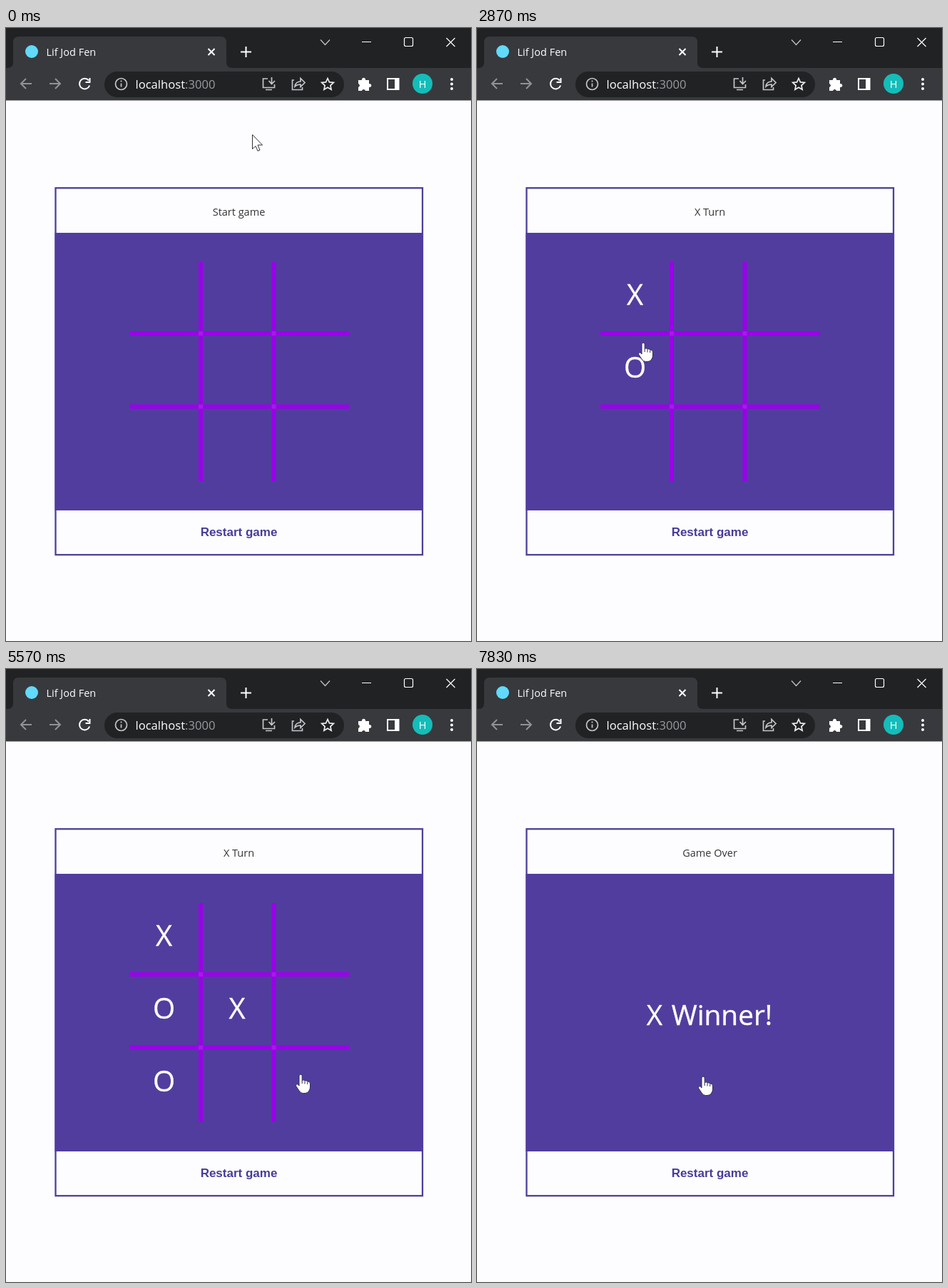
An HTML page that plays this animation: 652x859 px, repeating every 8 s.

```html
<!DOCTYPE html>
<html lang="en">
<head>
<meta charset="utf-8">
<title>Board game</title>
<style>
html, body { margin: 0; width: 100%; height: 100%; overflow: hidden; background: #fdfdff; }
svg { display: block; width: 652px; height: 859px; font-family: "Open Sans", "Noto Sans", sans-serif; }
.mid { text-anchor: middle; }
.mark { font-size: 40px; fill: #fff; stroke: #fff; stroke-width: .4; text-anchor: middle; }
#winner { font-size: 38.8px; word-spacing: 2.5px; }
.icon { fill: none; stroke: #fff; stroke-width: 2; }
.thin { stroke-width: 1.2; }
.dim { stroke: #c4c6ca; stroke-width: 1.7; }
</style>
</head>
<body>
<svg viewBox="0 0 652 859">
  <rect width="652" height="57" fill="#202224"/>
  <rect y="56" width="652" height="45.5" fill="#38393d"/>
  <path d="M2 56Q10 56 10 48V20Q10 12 18 12H301Q309 12 309 20V48Q309 56 317 56Z" fill="#38393d"/>
  <circle cx="36" cy="33" r="9" fill="#61dafb"/>
  <text x="56.5" y="38.5" font-size="14.5" font-weight="500" fill="#fff">Lif Jod Fen</text>
  <path class="icon" d="M283.500 29l9 9m0-9l-9 9M329 33.500h15m-7.500-7.500v15"/>
  <g class="icon thin">
    <path d="M441 16.500l6.500 7 6.500-7" stroke="#c4c6ca"/>
    <path d="M499 19.500h13M617.500 14l12 12m0-12l-12 12"/>
    <rect x="558.500" y="13.500" width="12" height="12" rx="2"/>
  </g>
  <g class="icon">
    <path d="M36 78H21m7-7l-7 7 7 7M61 78h15m-7-7l7 7-7 7" stroke="#8f9296"/>
    <path d="M116 73.500a7.300 7.300 0 1 0 1.200 7M117.500 70v6h-6"/>
  </g>
  <rect x="138" y="61" width="336" height="36" rx="18" fill="#202224"/>
  <g class="icon dim">
    <circle cx="161.500" cy="78.500" r="8"/>
    <path d="M161.500 77.500v5m0-9v2"/>
    <path d="M367 71h-6.500v12.500h16V79M364 86.500h9M372.500 69v9m-4-4l4 4.500 4.500-4.500"/>
    <path d="M404 73h-2.500v13.500h14V83M405 82q1-7 8-7v-4.500l6 6-6 6V79q-5 0-8 3Z"/>
    <path d="M451 70.500l2.400 5.400 5.900.6-4.400 4 1.200 5.800-5.100-3-5.100 3 1.200-5.800-4.400-4 5.900-.6Z" stroke="#eee"/>
  </g>
  <text x="181.500" y="85" font-size="16.600" font-weight="500" fill="#fff">localhost<tspan font-weight="400" fill="#999b9f">:3000</tspan></text>
  <path d="M494 73h5a2.600 2.600 0 1 1 5 0h5v5a2.600 2.600 0 1 1 0 5v5h-5a2.600 2.600 0 0 0-5 0h-5v-5a2.600 2.600 0 0 0 0-5Z" fill="#fff"/>
  <rect class="icon" x="535" y="71" width="15.500" height="15"/>
  <path d="M545 70h6v17h-6Z" fill="#fff"/>
  <circle cx="584" cy="78" r="14" fill="#14bdb9"/>
  <text class="mid" x="584" y="83.500" font-size="14.500" fill="#fff">H</text>
  <path d="M625 72h0m0 6.500h0m0 6.500h0" stroke="#fff" stroke-width="4" stroke-linecap="round"/>

  <rect x="69.500" y="224.200" width="514.500" height="514" fill="#fdfdff" stroke="#4c4199" stroke-width="2.300"/>
  <rect x="68.500" y="287" width="516.500" height="389" fill="#513d9e"/>
  <text class="mid" id="label" x="326.500" y="262.500" font-size="14.500" fill="#333"></text>
  <text class="mid" x="326.500" y="712" font-size="17" font-weight="700" fill="#473c98" font-family="Liberation Sans, Arial, sans-serif">Restart game</text>

  <g id="grid">
    <path d="M273 328V635M375.500 328V635M173 428H481M173 530.500H481" stroke="#9a00e9" stroke-width="6"/>
    <path d="M270 428h6m96.500 0h6M270 530.500h6m96.500 0h6" stroke="#a41be6" stroke-width="6"/>
  </g>
  <text class="mark" id="winner" x="326" y="499">X Winner!</text>

  <path id="arrow" d="M.5.500V20.500L5 16.500L8 23.300L11 22L8 15H14.500Z" fill="#fff" stroke="#333"/>
  <path id="hand" d="M-2 2Q-2 0 0 0T2.200 2V8.500Q4.300 7 6 9Q8.200 8 9.700 10Q13.500 9.500 13.500 13V18Q13.500 21 11.500 23.500Q10 26.500 6 26.500H3.500Q0 26.500-2 23L-6.300 16.500Q-7 14-5 13.700Q-3.500 13.500-2 16Z M2.200 8.500V13M6 9.500V13.500M9.700 10.500V14" fill="#fff" stroke="#332b55"/>
</svg>
<script>
const LOOP = 8000, STEP = 33, OVER = 5970;
const $ = id => document.getElementById(id);

// Cursor stops: start time, number of steps, end point
const stops = [
  [370, 4, 326, 191], [770, 3, 327, 339], [1270, 2, 208, 368],
  [2300, 3, 209, 438], [2700, 6, 233, 441], [3330, 5, 311, 489],
  [3870, 7, 253, 532], [4300, 6, 236, 571], [4970, 1, 390, 560],
  [5430, 5, 413, 568], [6500, 3, 327, 699], [7530, 4, 317, 571]
];

// Each play is a time and a cell; X and O take turns
const plays = [[2300, 0, 0], [2700, 0, 1], [3870, 1, 1], [4300, 0, 2]];
const player = turn => "XO"[turn % 2];
const marks = plays.map(([, col, row], turn) => {
  const el = document.createElementNS("http://www.w3.org/2000/svg", "text");
  el.setAttribute("class", "mark");
  el.setAttribute("x", 221.5 + col * 102.5);
  el.setAttribute("y", 388 + row * 102.2);
  el.textContent = player(turn);
  $("grid").append(el);
  return el;
});

const show = (el, on) => el.setAttribute("visibility", on ? "inherit" : "hidden");

function cursorAt(t) {
  let x = 345, y = 149;
  for (const [start, steps, toX, toY] of stops) {
    if (t < start) break;
    const p = Math.min(1, (Math.floor((t - start) / STEP) + 1) / steps);
    const eased = 1 - (1 - p) ** 2;
    x += (toX - x) * eased;
    y += (toY - y) * eased;
  }
  return [Math.round(x), Math.round(y)];
}

function labelAt(t) {
  const turn = plays.filter(([time]) => t >= time).length;
  if (t >= OVER) return "Game Over";
  return turn ? `${player(turn)} Turn` : "Start game";
}

function draw() {
  const t = performance.now() % LOOP;
  const [x, y] = cursorAt(t);
  const onBoard = y > 326;
  for (const id of ["arrow", "hand"]) {
    $(id).setAttribute("transform", `translate(${x} ${y})`);
    show($(id), (id === "hand") === onBoard);
  }
  $("label").textContent = labelAt(t);
  marks.forEach((el, i) => show(el, t >= plays[i][0]));
  show($("grid"), t < OVER);
  show($("winner"), t >= OVER);
  requestAnimationFrame(draw);
}
draw();
</script>
</body>
</html>
```
